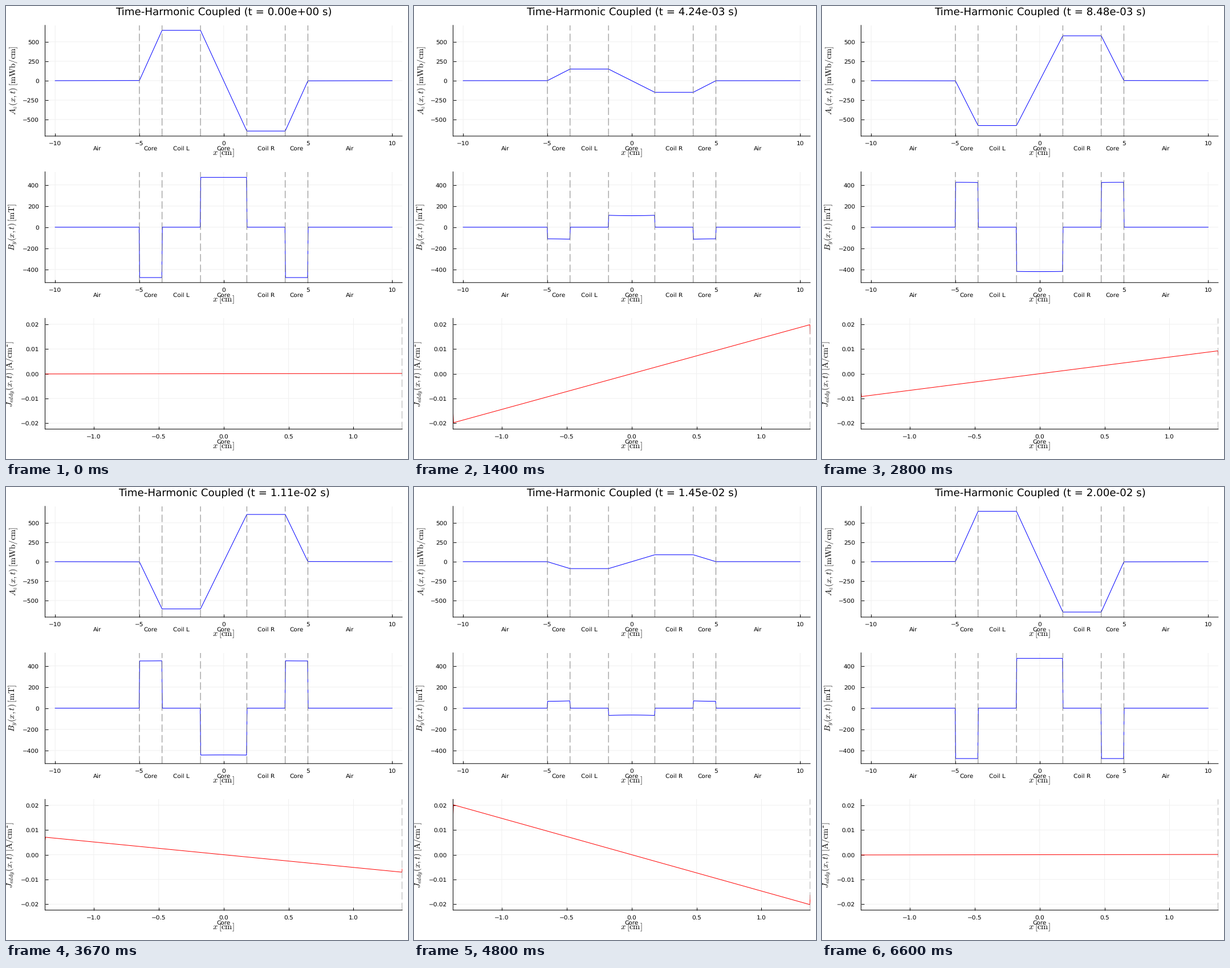
These frames come from a looping animation (705x794 px, 6.67 s). A matplotlib script:

```python
import numpy as np
import matplotlib.pyplot as plt
from matplotlib.animation import FuncAnimation

W, H, DPI = 705, 794, 64
PT = 72 / DPI                      # points per pixel
FRAMES, TICK = 230, 29             # 6670 ms loop
STEPS, STEP_MS = 100, 200 / 3      # time steps of the solution, 15 per second
PERIOD = 0.02                      # 50 Hz
PHASE = 0.005
LEG, COIL, EDGE = 1.375, 3.655, 5.0   # region borders in cm
A_MAX, B_MID, B_SIDE, J_MAX = 648, 471, 476, 0.02034
LEFT, WIDTH, HALF = 68.5, 626.4, 97.1
SMALL, LARGE, MATH = 10.45, 18.3, 14.67

plt.rcParams.update({"font.family": "DejaVu Sans", "mathtext.fontset": "cm",
                     "text.hinting": "no_hinting", "path.snap": False})
fig = plt.figure(figsize=(W / DPI, H / DPI), dpi=DPI, facecolor="white")


def label(x, y, s, size=SMALL, ha="center", **kw):
    return fig.text(x / W, 1 - y / H, s, fontsize=size * PT, ha=ha,
                    va="baseline", **kw)


def number(v, digits):
    return f"{v:.{digits}f}".replace("-", "\u2212")


def panel(mid, xmax, ymax, xticks, yticks, digits, name, name_x, regions, borders):
    ax = fig.add_axes([LEFT / W, 1 - (mid + HALF) / H, WIDTH / W, 2 * HALF / H])
    ax.set(xlim=(-xmax, xmax), ylim=(-ymax, ymax), xticks=xticks, yticks=yticks)
    ax.patch.set_visible(False)
    ax.set_axisbelow(True)
    ax.grid(color="#f0f0f0", lw=PT)
    ax.tick_params(direction="in", length=5 * PT, width=PT,
                   labelbottom=False, labelleft=False)
    for side in ("top", "right"):
        ax.spines[side].set_visible(False)
    for side in ("left", "bottom"):
        ax.spines[side].set_linewidth(PT)

    def px(x):
        return LEFT + WIDTH * (x / xmax + 1) / 2

    bottom = mid + HALF
    for v in xticks:
        label(px(v), bottom + 16, number(v, digits[0]))
    for v in yticks:
        label(58, mid - HALF * v / ymax + 4, number(v, digits[1]), ha="right")
    for x, s in regions:
        label(px(x), bottom + 25, s)
    label(381, bottom + 33.5, r"$x\:[\mathrm{cm}]$", MATH)
    label(name_x, mid, name, MATH, rotation=90, rotation_mode="anchor")

    for x in borders:
        ax.plot([x, x], [-ymax, ymax], color="#808080", lw=PT,
                dashes=(13, 5.5), dash_capstyle="butt", zorder=2.4)
    return ax


side, coil = (EDGE + COIL) / 2, (COIL + LEG) / 2
regions = [(-7.5, "Air"), (-side, "Core"), (-coil, "Coil L"), (0, "Core"),
           (coil, "Coil R"), (side, "Core"), (7.5, "Air")]
borders = [-EDGE, -COIL, -LEG, LEG, COIL, EDGE]
wide = [-10, -5, 0, 5, 10]
ax_a = panel(130.9, 10.6, 1.1 * A_MAX, wide, [-500, -250, 0, 250, 500], (0, 0),
             r"$A_z(x,t)\:[\mathrm{mWb/cm}]$", 17, regions, borders)
ax_b = panel(387.7, 10.6, 1.1 * B_SIDE, wide, [-400, -200, 0, 200, 400], (0, 0),
             r"$B_y(x,t)\:[\mathrm{mT}]$", 15, regions, borders)
ax_j = panel(644.5, LEG, 1.1 * J_MAX, [-1, -0.5, 0, 0.5, 1],
             [-0.02, -0.01, 0, 0.01, 0.02], (1, 2),
             r"$J_{eddy}(x,t)\:[\mathrm{A/cm^2}]$", 11, [(0, "Core")], [LEG])

# Vector potential: odd, piecewise linear
half_x = np.array([LEG, COIL, EDGE, 10])
half_a = np.array([-A_MAX, -A_MAX, -2, 0])
a_x = np.r_[-half_x[::-1], half_x]
a_shape = np.r_[-half_a[::-1], half_a]

# Flux density: even, in-phase steps plus a small quadrature bow in the cores
RAMP = 0.017
mid_x = np.linspace(0, LEG - RAMP, 20)
leg_x = np.linspace(COIL + RAMP, EDGE - RAMP, 20)
zero = np.zeros(2)
half_bx = np.r_[mid_x, LEG + RAMP, COIL - RAMP, leg_x, EDGE + RAMP, 10]
half_in = np.r_[np.full(20, B_MID), zero, np.full(20, -B_SIDE), zero]
half_quad = np.r_[4 * (mid_x / LEG) ** 2, zero,
                  -4 * ((EDGE - leg_x) / LEG) ** 2, zero]
b_x = np.r_[-half_bx[::-1], half_bx]
b_in = np.r_[half_in[::-1], half_in]
b_quad = np.r_[half_quad[::-1], half_quad]

# Eddy current: linear, dropping in the last mesh cell
CELL = 0.003
j_x = np.array([-LEG, -LEG + CELL, LEG - CELL, LEG])
j_shape = J_MAX * np.array([-0.81, -1, 1, 0.81])

line_a, = ax_a.plot(a_x, a_shape, color="blue", lw=PT)
line_b, = ax_b.plot(b_x, b_in, color="blue", lw=PT)
line_j, = ax_j.plot(j_x, j_shape, color="red", lw=PT)
title = label(382, 16, "", LARGE)


def update(i):
    # hold each time step until the next one is due
    step = min(int(((i + 1) * TICK - 1) / STEP_MS), STEPS - 1)
    t = PERIOD * step / (STEPS - 1)
    angle = 2 * np.pi * t / PERIOD + PHASE
    c, s = np.cos(angle), np.sin(angle)
    line_a.set_ydata(a_shape * c)
    line_b.set_ydata(b_in * c + b_quad * s)
    line_j.set_ydata(j_shape * s)
    title.set_text(f"Time-Harmonic Coupled (t = {t:.2e} s)")
    return line_a, line_b, line_j, title


anim = FuncAnimation(fig, update, frames=FRAMES, interval=TICK,
                     repeat=True, repeat_delay=0)
plt.show()
```
